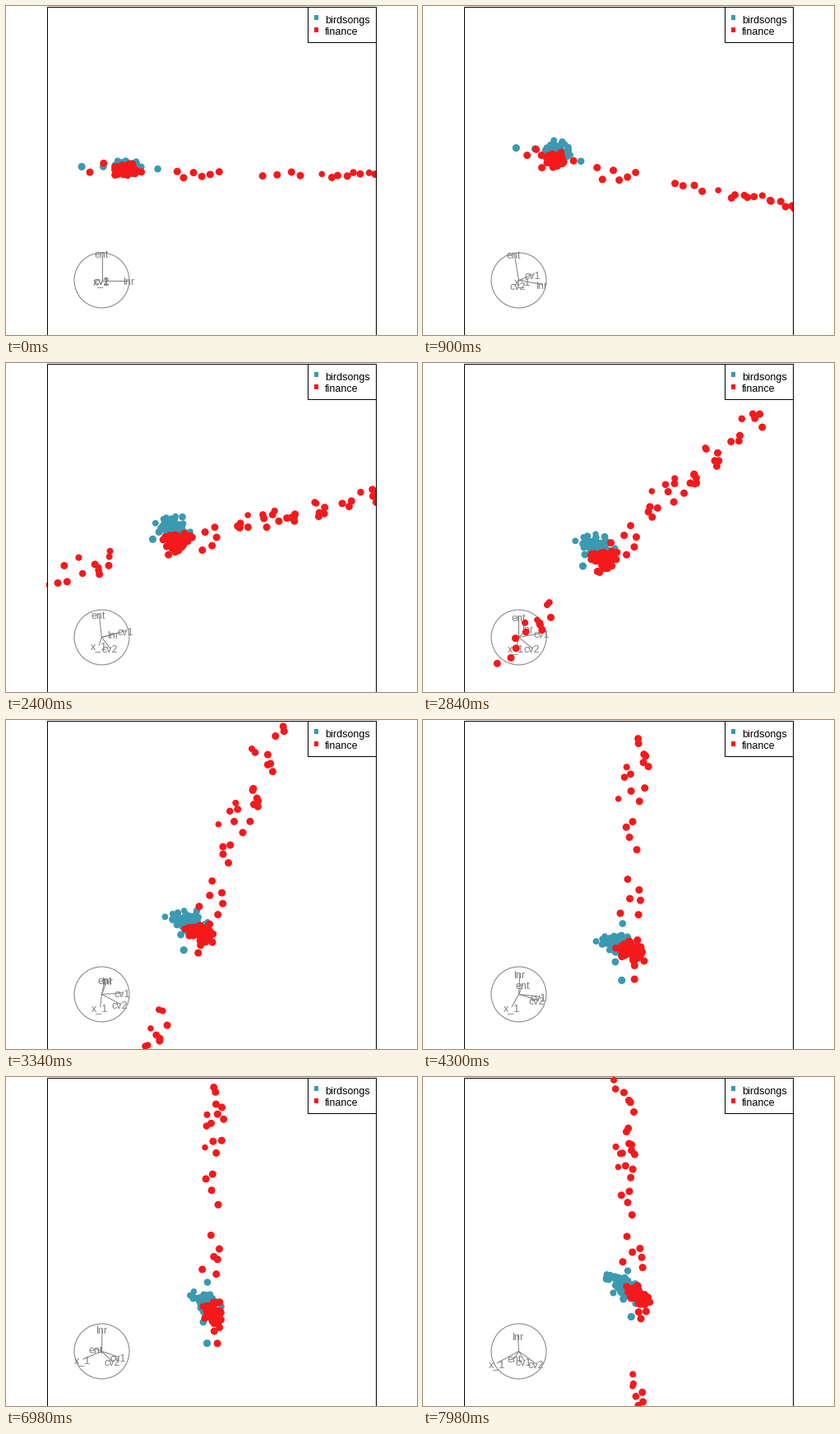
Write a matplotlib script that moves like this. It is 500 px wide and 400 px high and loops after 8 s.

```python
import numpy as np
import matplotlib.pyplot as plt
from matplotlib.animation import FuncAnimation
from matplotlib.patches import Circle, Rectangle

W, H, DPI = 500, 400, 100
PX = 72 / DPI
STEP, FRAMES = 20, 400
TEAL, RED, GREY = "#3B99B1", "#F5191C", "#7F7F7F"
FONT = dict(family="Liberation Sans", fontsize=9)

# Key poses of the tour: where each variable's axis points at the given times
NAMES = ["lnr", "ent", "cv1", "cv2", "x_1"]
TIMES = np.array([0, 1620, 2400, 3340, 4300, 5840, 7980])
POSES = np.array([
    [(1, 0), (0, 1), (0, 0), (0, 0), (0, 0)],
    [(.54, -.26), (-.25, .84), (.80, .36), (-.05, -.32), (.22, .02)],
    [(.43, .11), (-.10, .85), (.88, .24), (.30, -.40), (-.10, -.28)],
    [(.20, .52), (.12, .55), (.75, .05), (.66, -.35), (-.05, -.45)],
    [(.04, .75), (.15, .35), (.72, -.08), (.66, -.20), (-.25, -.45)],
    [(.06, .81), (-.20, .45), (.90, .01), (.00, -.18), (-.35, -.05)],
    [(-.03, .58), (-.15, -.25), (.20, -.35), (.62, -.45), (-.78, -.42)],
])

rng = np.random.default_rng(5)


def blob(n, mean, spread):
    """Random points in the five variables, without extreme values."""
    return mean + np.clip(rng.normal(size=(n, 5)), -1.9, 1.9) * spread


def trail(start, stop, n, mean, spread):
    """Points strung out along lnr, scattered in the other variables."""
    pts = blob(n, (0, *mean), (2, *spread))
    pts[:, 0] += np.linspace(start, stop, n)
    return pts


# Both classes share a dense cluster; finance has long tails on either side
teal = np.vstack([
    blob(75, (0, 1, 4, -15, 0), (7, 4, 8, 14, 4)),
    trail(-51, 40, 5, (-1, 0, -8, 0), (3, 6, 16, 0)),
])
right = dict(mean=(-8, -4, 8, 3), spread=(2, 6, 13, 3))
left = dict(mean=(-15, 5, 0, 0), spread=(6, 5, 9, 2))
red = np.vstack([
    blob(42, (0, -1, -4, 14, 0), (7, 4, 7, 10, 4)),
    trail(-47, 17, 5, (1, 0, 14, 0), (4, 6, 6, 0)),
    trail(59, 113, 6, **right),
    trail(170, 215, 4, **right),
    trail(240, 347, 13, **right),
    trail(400, 428, 6, **right),
    trail(470, 495, 3, **right),
    trail(535, 570, 5, **right),
    trail(-188, -256, 8, **left),
    trail(-280, -370, 5, **left),
])
points = np.vstack([teal, red]) + (-104, 3, 0, 0, 0)
radii = np.concatenate([
    rng.uniform(3.6, 4.6, len(teal)),
    4.5 - 0.05 * np.clip(-red[:, 3], 0, 30),
])


def basis(t):
    """Turn between neighbouring poses, keeping the length of each column."""
    k = min(np.searchsorted(TIMES, t, side="right") - 1, len(TIMES) - 2)
    f = (t - TIMES[k]) / (TIMES[k + 1] - TIMES[k])
    a, b = POSES[k], POSES[k + 1]
    mix = (1 - f) * a + f * b
    size = (1 - f) * np.linalg.norm(a, axis=0) + f * np.linalg.norm(b, axis=0)
    return mix * size / np.linalg.norm(mix, axis=0)


fig = plt.figure(figsize=(W / DPI, H / DPI), dpi=DPI, facecolor="white")
ax = fig.add_axes([0, 0, 1, 1])
ax.set(xlim=(0, W), ylim=(H, 0))
ax.axis("off")


def box(x, y, w, h, **kw):
    return ax.add_patch(Rectangle((x, y), w, h, **kw))


# Axis wheel
CX, CY, R = 116.5, 333.5, 33.5
ax.add_patch(Circle((CX, CY), R, fc="none", ec=GREY, lw=PX))
spokes = [ax.plot([], [], color=GREY, lw=PX)[0] for _ in NAMES]
labels = [ax.text(CX, CY, n, color=GREY, ha="center", va="baseline", **FONT)
          for n in NAMES]

# Points, clipped to the plot frame
box(49.5, 0.5, 400, 399, fc="none", ec="black", lw=PX)
colors = [TEAL] * len(teal) + [RED] * len(red)
dots = ax.scatter(points[:, 0], points[:, 1], s=(2 * radii * PX) ** 2,
                  c=colors, linewidths=0, zorder=4)
dots.set_clip_path(Rectangle((49, 0), 401, 400, transform=ax.transData))

# Legend
box(366.5, 0.5, 83, 43, fc="white", ec="black", lw=PX, zorder=6)
for y, name, color in [(14, "birdsongs", TEAL), (28.5, "finance", RED)]:
    box(375, y - 3, 5, 6, fc=color, ec="none", zorder=7)
    ax.text(388, y + 6.5, name, va="baseline", zorder=7, **FONT)


def draw(i):
    axes = basis(i * STEP)
    dots.set_offsets((W / 2, H / 2) + points @ axes * (1, -1))
    for (x, y), spoke, label in zip(axes, spokes, labels):
        tip = CX + R * x, CY - R * y
        spoke.set_data([CX, tip[0]], [CY, tip[1]])
        label.set_position((tip[0] - 0.5, tip[1] + 5.5))
    return [dots, *spokes, *labels]


anim = FuncAnimation(fig, draw, frames=FRAMES, interval=STEP,
                     repeat=True, repeat_delay=0)
plt.show()
```
